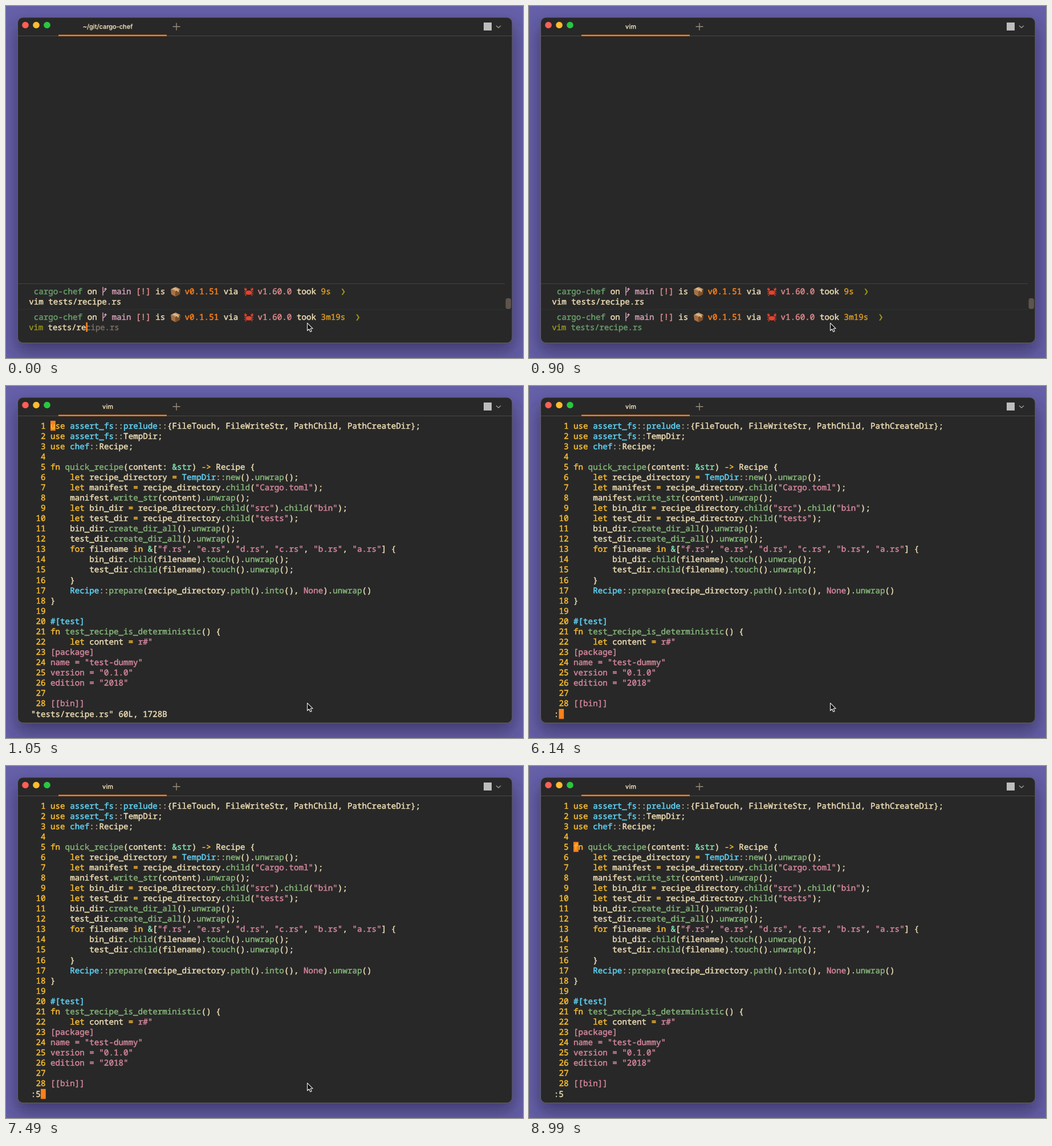
Write an HTML page that moves like this. It is 907x618 px and loops after 9440 ms.

```html
<!DOCTYPE html>
<html lang="en">
<head>
<meta charset="utf-8">
<title>Terminal</title>
<style>
  html, body { margin: 0; width: 100%; height: 100%; overflow: hidden; background: #6560a8; }
  svg { display: block; width: 100%; height: 100%; }
  text { white-space: pre; text-rendering: geometricPrecision; stroke-linejoin: round; }
  /* The thin outline gives a weight between regular and bold. */
  .mono { font: 400 14.23px "Noto Sans Mono", "DejaVu Sans Mono", monospace; font-variant-ligatures: none; stroke-width: .5px; }
  .input { font-size: 13.9px; }
  .tab { font: 500 11px Inter, Roboto, sans-serif; stroke-width: .25px; }
</style>
</head>
<body>
<svg viewBox="0 0 907 618">
  <defs>
    <filter id="blur" x="-10%" y="-10%" width="120%" height="120%"><feGaussianBlur stdDeviation="15"/></filter>
    <g id="box">
      <path d="M0 4 8.500 0 17 4 8.500 8z" fill="#c99a6b"/>
      <path d="M0 4 8.500 8V17L1 13z" fill="#a87143"/>
      <path d="M17 4 8.500 8V17L16 13z" fill="#805129"/>
      <path d="M3.500 2.400 12 6.400V9L14 8V5.400L5.500 1.400z" fill="#e3c79d"/>
    </g>
    <g id="crab" fill="#e5432d">
      <g fill="none" stroke="#d63c28" stroke-width="1.400" stroke-linecap="round">
        <path d="M4 8 1 7M4 10 1 11M5 11.500 2.500 14M13 8l3-1M13 10l3 1M12 11.500l2.500 2.500M4 6 2.500 4M13 6l1.500-2"/>
      </g>
      <ellipse cx="8.500" cy="9" rx="5.200" ry="3.800"/>
      <path d="M2.500 5.500C-.5 4 .5 1 3 0L2.700 2.500 5 1.500C5.500 4 4.500 5.500 2.500 5.500zM14.500 5.500C17.500 4 16.500 1 14 0L14.300 2.500 12 1.500C11.500 4 12.500 5.500 14.500 5.500z"/>
      <path d="M6.700 6V4M10.300 6V4" stroke="#e5432d"/>
      <g fill="#30100c"><circle cx="6.700" cy="4" r="1"/><circle cx="10.300" cy="4" r="1"/></g>
    </g>
    <path id="branch" d="M1.500 0V15M1.500 10C1.500 7.500 6 8.500 6 4.500V2.500M4 4.500 6 2.300 8 4.500" fill="none" stroke="#d3a0b5" stroke-width="1.500"/>
    <path id="chevron" d="M0 0H2.300L6 5.500 2.300 11H0L3.500 5.500z" fill="#98971a"/>
  </defs>

  <rect width="907" height="618" fill="#6560a8"/>
  <rect x="17" y="34" width="875" height="574" rx="14" fill="#211f3d" opacity=".52" filter="url(#blur)"/>
  <rect x="20.500" y="20" width="867.500" height="571.500" rx="9.500" fill="#282828" stroke="#625f64"/>
  <path d="M21 52.500H888" stroke="#4b4946"/>
  <path d="M92 51.800H282" stroke="#fe8019" stroke-width="2.400"/>
  <circle cx="34" cy="33.500" r="5.800" fill="#ff5f57"/>
  <circle cx="53" cy="33.500" r="5.800" fill="#febc2e"/>
  <circle cx="72" cy="33.500" r="5.800" fill="#28c840"/>
  <text id="title" class="tab" x="178.500" y="40.400" text-anchor="middle" fill="#ebdbb2" stroke="#ebdbb2"></text>
  <path d="M292.500 36.300H305.500M299 29.800V42.800" stroke="#998f7c" stroke-width="1.400"/>
  <rect x="838" y="29" width="14" height="14" fill="#bdbdbd"/>
  <path d="M860 34.500 864 38.300 868 34.500" fill="none" stroke="#a09a8d" stroke-width="1.300"/>

  <g id="shell">
    <path d="M21 487.500H875" stroke="#444240"/>
    <path d="M21 532.500H875" stroke="#302f2f"/>
    <rect x="876.500" y="513" width="9.500" height="19" rx="4" fill="#5d544d"/>
    <rect id="caret" y="555.500" width="2.700" height="16.500" fill="#fe8019"/>
  </g>
  <g id="editor">
    <rect id="block" width="8.800" height="17.500" fill="#fe8019"/>
    <text id="status" class="mono" x="43.840" y="580.500" fill="#ebdbb2" stroke="#ebdbb2"></text>
  </g>
  <path id="pointer" d="M.6.700V14L3.700 11.200 5.900 16 8.200 15 6.100 10.300H10.300z" fill="#111" stroke="#eee" stroke-width="1.100" stroke-linejoin="round"/>
</svg>

<script>
const LOOP = 9440, ADVANCE = 8.54, PITCH = 18.07, LEFT = 43.84, SHELL_LEFT = 40.2, INPUT_ADVANCE = 8.34;
const color = {
  fg: '#ebdbb2', yellow: '#fabd2f', green: '#84b378', cyan: '#5fd3f5', aqua: '#7fe3b3', pink: '#d3869b',
  dim: '#b5a88c', orange: '#fe8019', teal: '#689d6a', branch: '#d3a0b5', rose: '#e08a8a',
  gold: '#d79921', olive: '#98971a', ghost: '#7c6f64'
};
const source = `use assert_fs::prelude::{FileTouch, FileWriteStr, PathChild, PathCreateDir};
use assert_fs::TempDir;
use chef::Recipe;

fn quick_recipe(content: &str) -> Recipe {
    let recipe_directory = TempDir::new().unwrap();
    let manifest = recipe_directory.child("Cargo.toml");
    manifest.write_str(content).unwrap();
    let bin_dir = recipe_directory.child("src").child("bin");
    let test_dir = recipe_directory.child("tests");
    bin_dir.create_dir_all().unwrap();
    test_dir.create_dir_all().unwrap();
    for filename in &["f.rs", "e.rs", "d.rs", "c.rs", "b.rs", "a.rs"] {
        bin_dir.child(filename).touch().unwrap();
        test_dir.child(filename).touch().unwrap();
    }
    Recipe::prepare(recipe_directory.path().into(), None).unwrap()
}

#[test]
fn test_recipe_is_deterministic() {
    let content = r#"
[package]
name = "test-dummy"
version = "0.1.0"
edition = "2018"

[[bin]]`;

const $ = id => document.getElementById(id);

function add(parent, tag, attrs, content = '') {
  const node = document.createElementNS('http://www.w3.org/2000/svg', tag);
  for (const key in attrs) node.setAttribute(key, attrs[key]);
  node.textContent = content;
  return parent.appendChild(node);
}
const write = (parent, x, y, content, ink, style = '') =>
  add(parent, 'text', { class: 'mono ' + style, x, y, fill: ink, stroke: ink }, content);
function paint(node, ink) {
  node.setAttribute('fill', ink);
  node.setAttribute('stroke', ink);
}
const show = (node, visible) => node.setAttribute('visibility', visible ? 'inherit' : 'hidden');
const rowTop = row => 61 + (row - 1) * PITCH;

function tokenColor(token, rest) {
  if (/^(use|fn|let|for|in|->|=)$/.test(token)) return color.yellow;
  if (/^("|r#|None)/.test(token)) return color.pink;
  if (token[0] === '&') return color.aqua;
  if (token === '::') return color.dim;
  if (token === '#[test]') return color.cyan;
  if (/^\w/.test(token) && rest.startsWith('::')) return color.cyan;
  if (/^\w/.test(token) && rest[0] === '(') return color.green;
  return color.fg;
}

function buildEditor() {
  const rawStart = 22;
  source.split('\n').forEach((line, i) => {
    const y = 74.5 + i * PITCH, label = String(i + 1);
    write($('editor'), LEFT + (3 - label.length) * ADVANCE, y, label, color.yellow);
    const tokens = i >= rawStart ? /.+/g : /"[^"]*"|r#"|#\[test\]|->|::|&(?:str)?|\w+|[^\s\w]/g;
    for (const { 0: token, index } of line.matchAll(tokens)) {
      const ink = i >= rawStart ? color.pink : tokenColor(token, line.slice(index + token.length));
      write($('editor'), LEFT + (index + 4) * ADVANCE, y, token, ink);
    }
  });
}

function buildPrompt(y, duration) {
  const shell = $('shell'), at = col => SHELL_LEFT + col * ADVANCE;
  const parts = [
    [1, 'cargo-chef', 'teal'], [12, 'on', 'fg'], [17, 'main', 'branch'], [22, '[!]', 'rose'], [26, 'is', 'fg'],
    [32, 'v0.1.51', 'orange'], [40, 'via', 'fg'], [47, 'v1.60.0', 'rose'], [55, 'took', 'fg'], [60, duration, 'gold']
  ];
  for (const [col, word, name] of parts) write(shell, at(col), y, word, color[name]);
  const icon = (id, x, top) => add(shell, 'use', { href: '#' + id, x, y: top });
  icon('branch', 168.5, y - 13);
  icon('box', 289, y - 13);
  icon('crab', 417.5, y - 12);
  icon('chevron', at(62 + duration.length) + 1.8, y - 10);
}

buildEditor();
buildPrompt(506.3, '9s');
write($('shell'), SHELL_LEFT, 524.3, 'vim tests/recipe.rs', color.fg);
buildPrompt(551.3, '3m19s');
const inputWord = (col, word, ink) => write($('shell'), SHELL_LEFT + col * INPUT_ADVANCE, 568.6, word, ink, 'input');
inputWord(0, 'vim', color.olive);
const typed = inputWord(4, 'tests/re', color.fg);
const rest = inputWord(12, 'cipe.rs', color.ghost);
$('shell').append($('caret'));

function render(t) {
  const editing = t >= 1050, accepted = t >= 150;
  show($('shell'), !editing);
  show($('editor'), editing);
  $('title').textContent = t < 900 ? '~/git/cargo-chef' : 'vim';

  paint(typed, accepted ? color.teal : color.fg);
  paint(rest, accepted ? color.teal : color.ghost);
  $('caret').setAttribute('x', SHELL_LEFT + (accepted ? 20 : 12) * INPUT_ADVANCE);
  show($('caret'), t < 600);

  const [row, col] = t < 3750 ? [1, 4] : t < 6140 ? [20, 4] : t < 7490 ? [29, 1] : t < 8240 ? [29, 2] : [5, 4];
  $('block').setAttribute('x', LEFT + col * ADVANCE);
  $('block').setAttribute('y', rowTop(row));
  $('status').textContent = t < 6140 ? '"tests/recipe.rs" 60L, 1728B' : t < 7490 ? ':' : ':5';

  const [x, y] = t < 8690 ? [528, 556] : t < 8840 ? [572, 566] : [868, 612];
  $('pointer').setAttribute('transform', `translate(${x} ${y})`);
  show($('pointer'), t < 8990);
}

const start = performance.now();
function tick() {
  render((performance.now() - start) % LOOP);
  requestAnimationFrame(tick);
}
tick();
</script>
</body>
</html>
```
